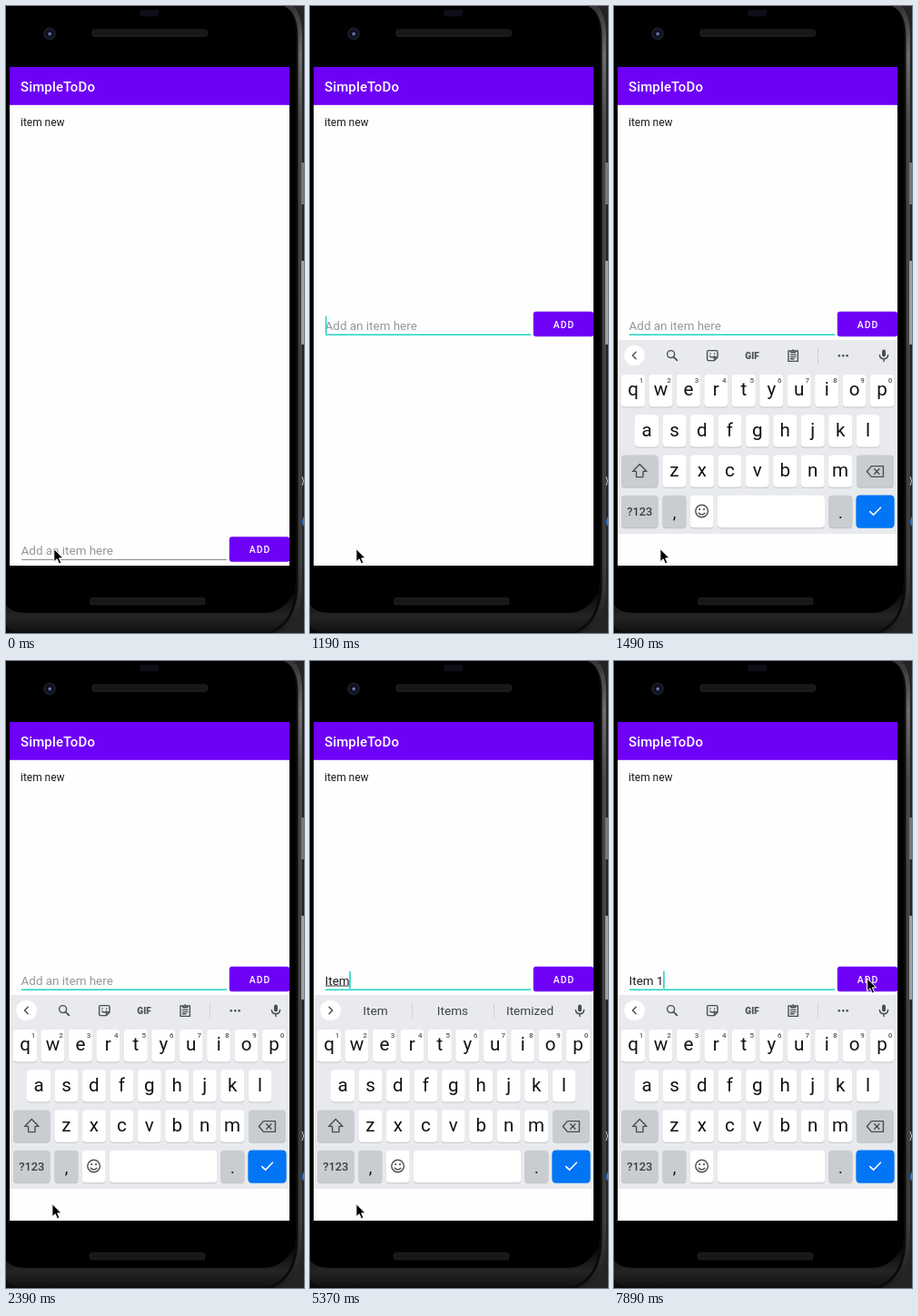
Animation, 328 px wide and 689 px high, one loop 8 s. Source, as an HTML page:

```html
<!DOCTYPE html>
<html lang="en">
<head>
<meta charset="utf-8">
<title>To-do entry</title>
<style>
  html, body { margin: 0; width: 100%; height: 100%; overflow: hidden; background: #000; }
  svg { display: block; width: 328px; height: 689px; font-family: Roboto, sans-serif; }
  text { white-space: pre; }
  .mid { text-anchor: middle; }
  .icon { fill: none; stroke: #4b4e53; stroke-width: 1.4; stroke-linejoin: round; stroke-linecap: round; }
</style>
</head>
<body>
<svg viewBox="0 0 328 689">
  <defs>
    <linearGradient id="chin" x1="0" y1="0" x2="0" y2="1">
      <stop offset="0" stop-color="#060606"/>
      <stop offset=".6" stop-color="#242424"/>
      <stop offset="1" stop-color="#111"/>
    </linearGradient>
    <linearGradient id="edge" x1="0" y1="0" x2="0" y2="1">
      <stop offset="0" stop-color="#2c2c2d"/>
      <stop offset=".09" stop-color="#6c6c6e"/>
      <stop offset=".2" stop-color="#48484a"/>
      <stop offset=".9" stop-color="#3c3c3e"/>
      <stop offset="1" stop-color="#1c1c1d"/>
    </linearGradient>
    <pattern id="mesh" width="3" height="3" patternUnits="userSpaceOnUse">
      <rect width="3" height="3" fill="#131311"/>
      <circle cx="1.5" cy="1.5" r=".8" fill="#26261f"/>
    </pattern>
    <clipPath id="screen"><rect x="4" y="67" width="308" height="548"/></clipPath>
  </defs>

  <!-- desktop and phone body -->
  <rect width="328" height="689" fill="#242426"/>
  <path d="M-4-8H304Q326-2 326 34V638Q326 676 302 689H-4Z" fill="url(#edge)"/>
  <path d="M0 0H306Q321.500 6 321.500 36V636Q321 676 294 689H0Z" fill="#0b0b0b"/>
  <path d="M0 0H305Q319 5 319 34V632Q319 667 284 669H22Q4 669 0 658Z" fill="#000"/>
  <path d="M0 658Q4 667 24 667H284Q307 666 316 644Q318 676 288 688H20Q4 688 0 680Z" fill="url(#chin)"/>
  <path d="M0 659Q5 668 24 668H284" fill="none" stroke="#242424"/>
  <rect x="325" y="172" width="3" height="46" fill="#77787a"/>
  <rect x="325" y="280" width="3" height="92" fill="#a0a1a3"/>
  <path d="M326 517q3 5 0 10" fill="none" stroke="#c8c8c8"/>
  <path d="M328 561q-4 6 0 11z" fill="#1683f2"/>
  <rect x="147" y="4" width="21" height="7.5" rx="2" fill="#0d0e17"/>
  <circle cx="48" cy="30.5" r="7" fill="#191b22"/>
  <circle cx="48" cy="30.5" r="4.6" fill="#0c0f20"/>
  <circle cx="48.3" cy="30.8" r="2.2" fill="#34416f"/>
  <circle cx="48" cy="30.5" r="1" fill="#a3aed0"/>
  <g fill="url(#mesh)" stroke="#2a2a27" stroke-width=".8">
    <rect x="95" y="26" width="126.500" height="7.4" rx="2.5"/>
    <rect x="92.500" y="650.400" width="126.500" height="7.4" rx="2.5"/>
  </g>

  <g clip-path="url(#screen)">
    <rect x="4" y="67" width="308" height="548" fill="#fefefe"/>
    <rect x="4" y="67" width="308" height="41.8" fill="#6e00f8"/>
    <text x="16" y="94.2" font-size="14.92" font-weight="500" letter-spacing=".0125em" fill="#fff">SimpleToDo</text>
    <text x="16" y="131.6" font-size="11.94" fill="#1c1c1c">item new</text>
    <g id="keyboard">
      <rect x="4" y="367" width="308" height="213" fill="#e8eaed"/>
      <g id="keys"></g>
      <circle cx="22.5" cy="384" r="11.2" fill="#fff"/>
      <path id="chevron" class="icon"/>
      <g id="tools" class="icon">
        <circle cx="62.6" cy="382.6" r="4"/>
        <path d="M65.6 385.6L69.4 389.4" stroke-width="1.7"/>
        <path d="M104 378.6H112.5Q114 378.6 114 380V386L110.5 389.6H104Q102.6 389.6 102.6 388V380Q102.6 378.6 104 378.6ZM114 386H110.5V389.6M105.6 384.8q2.6 3 5 0M106 382v.2M110.6 382v.2"/>
        <text class="mid" x="152" y="387.6" font-size="10" font-weight="900" fill="#4b4e53" stroke="none">GIF</text>
        <path d="M192 379H202.4V390.4H192ZM194.8 379V380.8H199.6V379M197.2 379v-1.4M194.5 383.4H200M194.5 385.6H200M194.5 387.8H198"/>
        <path d="M224.5 376V392.5" stroke="#cfd1d5" stroke-width="1"/>
        <path d="M247.8 384.3h.1M252.2 384.3h.1M256.6 384.3h.1" stroke-width="2.6"/>
      </g>
      <g id="words" font-size="13.6" fill="#404348">
        <path d="M112.5 376V392.5M202.5 376V392.5" stroke="#cfd1d5"/>
        <text class="mid" x="72" y="389"></text>
        <text class="mid" x="157" y="389"></text>
        <text class="mid" x="242" y="389"></text>
      </g>
      <rect x="295" y="377.4" width="4" height="8" rx="2" fill="#4b4e53"/>
      <path class="icon" d="M292.4 383.4Q292.6 387.6 297 387.8Q301.4 387.6 301.6 383.4M297 388v2.6"/>
    </g>
    <g id="field">
      <text id="entry" x="16.600" y="355.8" font-size="13.43"></text>
      <path id="compose" stroke="#333" stroke-width="1"/>
      <rect id="line" x="17" y="360.5" width="226"/>
      <rect id="caret" y="341" width="1.6" height="19" fill="#22d3c5"/>
      <rect x="245.800" y="335.700" width="66.400" height="27.600" rx="3" fill="#6e00f8"/>
      <text class="mid" x="279.5" y="353.8" font-size="10.45" font-weight="500" letter-spacing=".93" fill="#fff">ADD</text>
    </g>
  </g>
  <path id="mouse" d="M0 0V14.2L3.3 11.2L5.6 16.4L8 15.4L5.8 10.3H10.2Z" fill="#000" stroke="#fff" stroke-width="1"/>
</svg>
<script>
const LOOP = 8000;
const $ = id => document.getElementById(id);
const show = (el, on) => el.setAttribute('display', on ? 'inline' : 'none');

// ---- keyboard ----
const GREY = '#c9ccd1', BLUE = '#0075f5';
let keys = '';
function key(x, y, w, fill = '#fff', shade = '#bfc2c7') {
  keys += `<rect x="${x}" y="${y + 1}" width="${w}" height="35.4" rx="4" fill="${shade}"/>` +
          `<rect x="${x}" y="${y}" width="${w}" height="35.4" rx="4" fill="${fill}"/>`;
}
function label(x, y, size, s, weight = 400, fill = '#111214') {
  keys += `<text class="mid" x="${x}" y="${y}" font-size="${size}" font-weight="${weight}" fill="${fill}">${s}</text>`;
}
[['qwertyuiop', 21], ['asdfghjkl', 36], ['zxcvbnm', 66.4]].forEach(([row, first], r) => {
  [...row].forEach((ch, i) => {
    const x = first + i * 30.45, y = 405 + r * 44.2;
    key(x - 13, y, 26);
    label(x, y + 23.4, 20.6, ch);
    if (r === 0) label(x + 9, y + 9, 8, (i + 1) % 10, 500, '#55585d');
  });
});
key(8, 493.4, 40.6, GREY);
key(267, 493.4, 41, GREY);
key(8, 537.8, 40.6, GREY);
key(53.4, 537.8, 26, GREY);
key(83.6, 537.8, 26);
key(114, 537.8, 118);
key(236.4, 537.8, 26, GREY);
key(266.6, 537.4, 41.8, BLUE, BLUE);
label(28.3, 559.8, 12.8, '?123', 500, '#3c4043');
label(66.4, 562.6, 18, ',');
label(249.4, 562.6, 18, '.');
keys += `<g class="icon">
  <path d="M28.3 503.6L36 511.4H32V517.6H24.6V511.4H20.6Z"/>
  <path d="M283.4 505.6H296.4V517.4H283.4L278.4 511.5ZM286.6 508.7L292 514.3M292 508.7L286.6 514.3"/>
  <circle cx="96.6" cy="555" r="6.8"/>
  <path d="M93.2 557.2q3.4 3.4 6.8 0"/>
  <path d="M94.2 553v.2M99 553v.2" stroke-width="2"/>
  <path d="M281.8 555.6L285.6 559.2L293.4 551.2" stroke="#fff" stroke-width="1.6"/>
</g>`;
$('keys').innerHTML = keys;

// ---- timeline: each step changes part of the state ----
const TOP = 0, LOW = 247.5;
const steps = [
  [0, { drop: LOW, kb: null, focus: false, text: '', caretX: 16.8, caret: false, under: 0, words: null, mouse: [52.8, 596.5] }],
  [600, { mouse: [50.9, 596.5] }],
  [740, { focus: true }],
  [890, { caret: true }],
  [1190, { drop: TOP }],
  [1340, { kb: 16.5, caret: false }],
  [1490, { kb: 0 }],
  [1790, { caret: true }],
  [2390, { caret: false }],
  [2840, { caret: true }],
  [3440, { caret: false }],
  [3590, { text: 'I', caretX: 20.3, caret: true, under: 20.3 }],
  [3880, { text: 'It', caretX: 24.5, under: 24.5 }],
  [4030, { text: 'Ite', caretX: 31.8, under: 31.8 }],
  [4180, { text: 'Item', caretX: 43.2, words: ['Ite', 'Item', 'Items'] }],
  [4480, { under: 43.4, words: ['Item', 'Items', 'Itemized'] }],
  [4930, { caret: false }],
  [5370, { caret: true }],
  [5520, { text: 'Item ', caretX: 46.8, under: 0 }],
  [5660, { words: ['', '', ''] }],
  [5810, { text: 'Item 1', caretX: 54.1 }],
  [6110, { words: null }],
  [6410, { caret: false }],
  [6860, { caret: true }],
  [7300, { caret: false }],
  [7890, { caret: true }]
];

// pointer travels from the field to the button
const travel = { start: 7150, gap: 148, from: [50.9, 596.5], to: [278.5, 348.6] };
function pointer(t, rest) {
  if (t < travel.start) return rest;
  const k = Math.min(1, (Math.floor((t - travel.start) / travel.gap) + 1) / 6);
  const p = k * k * (3 - 2 * k);
  return travel.from.map((a, i) => a + (travel.to[i] - a) * p);
}

function stateAt(t) {
  const s = {};
  for (const [at, change] of steps) if (at <= t) Object.assign(s, change);
  return s;
}

const wordEls = $('words').querySelectorAll('text');

function draw(t) {
  const s = stateAt(t);
  $('field').setAttribute('transform', `translate(0 ${s.drop})`);
  show($('keyboard'), s.kb !== null);
  $('keyboard').setAttribute('transform', `translate(0 ${s.kb || 0})`);

  $('entry').textContent = s.text || 'Add an item here';
  $('entry').setAttribute('fill', s.text ? '#1c1c1c' : '#979797');
  $('compose').setAttribute('d', s.under ? `M17 357H${s.under}` : '');
  $('line').setAttribute('height', s.focus ? 1.5 : 1);
  $('line').setAttribute('fill', s.focus ? '#22d3c5' : '#8c8c8c');
  $('caret').setAttribute('x', s.caretX);
  show($('caret'), s.caret);

  show($('tools'), !s.words);
  show($('words'), s.words);
  if (s.words) s.words.forEach((w, i) => { wordEls[i].textContent = w; });
  $('chevron').setAttribute('d', s.words ? 'M21 380.2L24.8 384L21 387.8' : 'M24.2 380.2L20.4 384L24.2 387.8');
  $('mouse').setAttribute('transform', `translate(${pointer(t, s.mouse)})`);
}

const begin = performance.now();
(function tick() {
  draw((performance.now() - begin) % LOOP);
  requestAnimationFrame(tick);
})();
</script>
</body>
</html>
```
